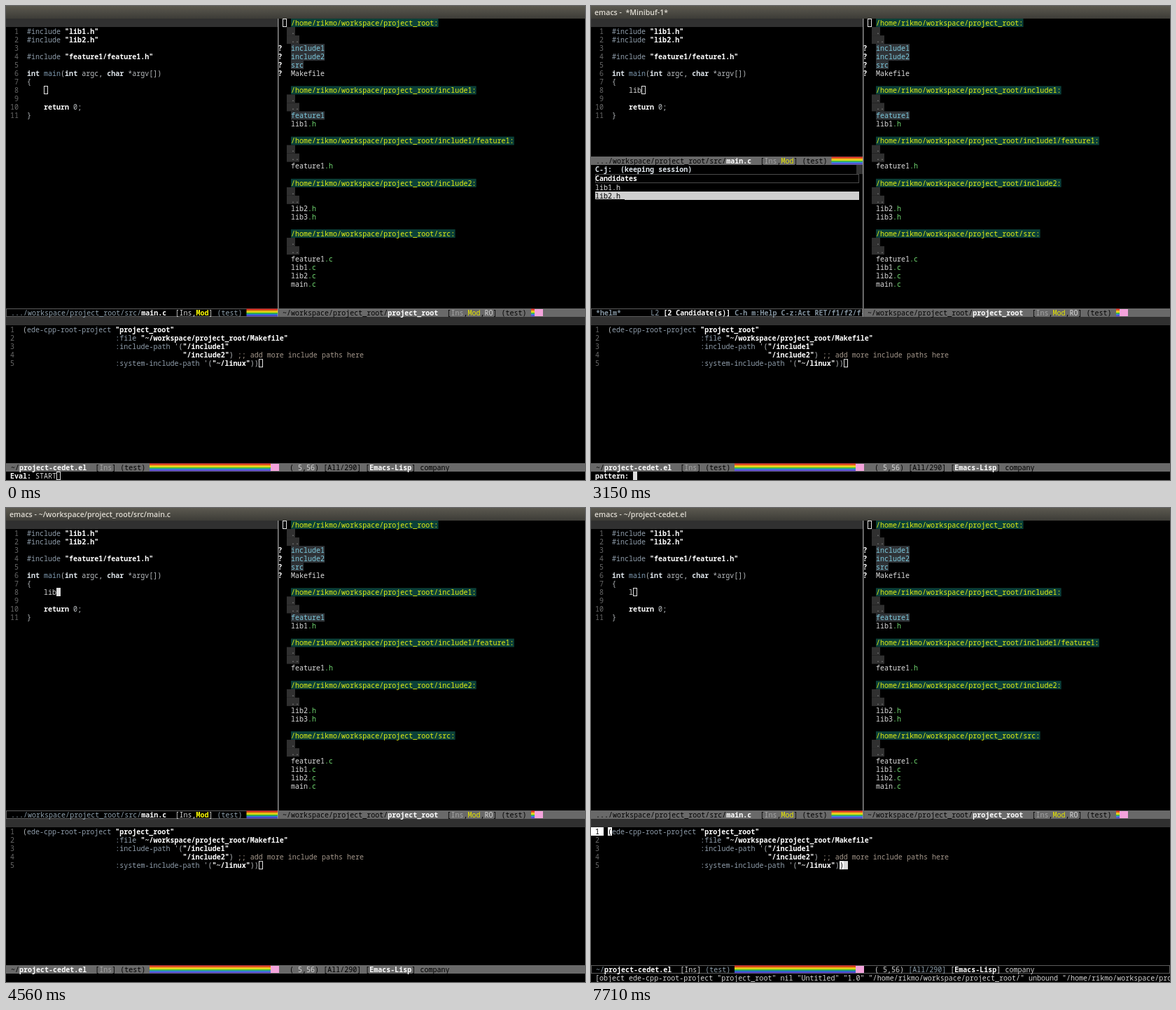
Write an HTML page that moves like this. It is 827 px wide and 677 px high and loops after 8 s.

```html
<!DOCTYPE html>
<html lang="en">
<head>
<meta charset="utf-8">
<title>emacs</title>
<style>
html, body { margin: 0; width: 100%; height: 100%; overflow: hidden; background: #000; }
svg { display: block; width: 827px; height: 677px; }
text { font: 10.025px "Noto Sans Mono", "DejaVu Sans Mono", monospace; white-space: pre; fill: #b9bdc0; }
.title { font: 600 10.6px "Open Sans", "Noto Sans", sans-serif; fill: #dfdbd2; }
.b, .str, .kw, .mod, .cmd { font-weight: 700; }
.b, .str { fill: #fff; }
.kw { fill: #dde4ea; }
.pre { fill: #8f9dab; }
.fn { fill: #7f9ab0; }
.cm { fill: #a3968a; }
.num { fill: #686868; }
.steel { fill: #8fa1ae; }
.cmd { fill: #8494a0; }
.lit { fill: #d6d6d6; }
.dark { fill: #000; }
.dim { fill: #a5a5a5; }
.yel { fill: #e6e600; }
.mod { fill: #ffff00; }
.path { fill: #e2ee12; }
.dir { fill: #7cc8dc; }
.dot { fill: #9a9a9a; }
.file { fill: #dcdcdc; }
.ext { fill: #6fd66f; }
</style>
</head>
<body>
<svg viewBox="0 0 827 677">
  <defs>
    <linearGradient id="bar" x2="0" y2="1">
      <stop offset="0" stop-color="#5b5950"/><stop offset="1" stop-color="#3d3c37"/>
    </linearGradient>
    <clipPath id="left"><rect width="388" height="677"/></clipPath>
  </defs>
  <g id="base"></g>
  <g id="live"></g>
</svg>
<script>
const LOOP = 8000, COL = 6.015, ROW = 12.04;
const USER = 'rikmo';
const HOME = `/home/${USER}/workspace/project_root`;
const RAINBOW = ['#e8231b', '#f59a16', '#f4ea1c', '#3fc62f', '#2b8df0', '#5b45d8'];

const rect = (x, y, w, h, fill) =>
  `<rect x="${x}" y="${y}" width="${w}" height="${h}" fill="${fill}"/>`;
const frame = (x, y, w, h, color) =>
  `<rect x="${x + .5}" y="${y + .5}" width="${w - 1}" height="${h - 1}" fill="none" stroke="${color}"/>`;

// Each run is "class|text"; top is the top edge of the text row.
const line = (x, top, ...runs) => `<text x="${x}" y="${top + 9.8}">` + runs.map(run => {
  const cut = run.indexOf('|');
  return `<tspan class="${run.slice(0, cut)}">${run.slice(cut + 1)}</tspan>`;
}).join('') + '</text>';

const cursor = (x, top, solid) => solid
  ? rect(x, top, 6, 12, '#dcdcdc')
  : frame(x, top, 6, 12, '#e6e6e6');

const rainbow = (x, top, w) =>
  RAINBOW.map((c, i) => rect(x, top + .5 + i * 1.8, w, 1.8, c)).join('');

const modeBar = (x, top, w, active) => active
  ? rect(x, top, w, 12, '#000') + frame(x, top, w, 12, '#5c5c5c')
  : rect(x, top, w, 12, '#696969');

const status = (active, ...more) => {
  const p = active ? 'lit' : 'dark';
  return [`${p}|  [`, active ? 'lit|Ins' : 'dim|Ins', ...more, `${p}|] `, `${active ? 'steel' : 'dark'}|(test)`];
};

function listing() {
  const X = 407, y = n => 18 + n * ROW;
  const out = [cursor(395, 18, false)];
  const head = (n, sub) => {
    const path = HOME + sub + ':';
    out.push(rect(X, y(n), path.length * COL, 12, '#0b4038'), line(X, y(n), 'path|' + path),
      rect(401, y(n + 1), 12, 12, '#303030'), line(X, y(n + 1), 'dot|.'),
      rect(401, y(n + 2), 18, 12, '#303030'), line(X, y(n + 2), 'dot|..'));
  };
  const dir = (n, name) => out.push(
    rect(X, y(n), name.length * COL, 12, '#303438'), line(X, y(n), 'dir|' + name));
  const files = (n, ...names) => names.forEach((name, i) => {
    const [stem, ext] = name.split('.');
    out.push(line(X, y(n + i), 'file|' + stem, 'ext|' + (ext ? '.' + ext : '')));
  });
  head(0, '');
  ['include1', 'include2', 'src'].forEach((d, i) => dir(3 + i, d));
  files(6, 'Makefile');
  for (let n = 3; n < 7; n++) out.push(line(388.5, y(n), 'b|?'));
  head(8, '/include1');
  dir(11, 'feature1');
  files(12, 'lib1.h');
  head(14, '/include1/feature1');
  files(17, 'feature1.h');
  head(19, '/include2');
  files(22, 'lib2.h', 'lib3.h');
  head(25, '/src');
  files(28, 'feature1.c', 'lib1.c', 'lib2.c', 'main.c');
  return out.join('');
}

function code() {
  const rows = [
    ['pre|#include ', 'str|"lib1.h"'],
    ['pre|#include ', 'str|"lib2.h"'],
    [],
    ['pre|#include ', 'str|"feature1/feature1.h"'],
    [],
    ['kw|int ', 'fn|main', '|(', 'kw|int', '| argc, ', 'kw|char', '| *argv[])'],
    ['|{'], [], [],
    ['b|    return', '| 0;'],
    ['|}']
  ];
  return rows.map((runs, i) => {
    const y = 30 + i * ROW;
    return line(6, y, 'num|' + String(i + 1).padStart(2)) + line(30, y, ...runs);
  }).join('');
}

const LISP = [
  [0, '|(', 'pre|ede-cpp-root-project ', 'str|"project_root"'],
  [22, 'pre|:file ', 'str|"~/workspace/project_root/Makefile"'],
  [22, 'pre|:include-path ', "|'(", 'str|"/include1"'],
  [38, 'str|"/include2"', '|) ', 'cm|;; add more include paths here'],
  [22, 'pre|:system-include-path ', "|'(", 'str|"~/linux"', '|))']
];

function lisp(s) {
  const active = s.focus === 'lisp';
  let out = '';
  LISP.forEach(([col, ...runs], i) => {
    const y = 456 + i * ROW;
    if (s.region) {
      out += rect(24, y, i < 4 ? 803 : 331, 12.1, '#0000ff');
      if (i) out += rect(0, y, 18, 12.1, '#0000ff');
      runs = runs.map(run => run.replace(/^\w*/, 'b'));
    }
    out += line(6, y, 'num|' + (i + 1)) + line(24 + col * COL, y, ...runs);
  });
  const end = 456 + 4 * ROW;
  if (s.paren) {
    out += rect(0, 456, 18, 12, '#fff') + line(6, 456, 'dark|1') +
      rect(24, 456, 6, 12, '#fff') + line(24, 456, 'dark|(') +
      rect(355, end, 6, 12, '#fff') + line(355, end, 'dark|)');
  }
  out += cursor(361, end, active);

  const p = active ? 'lit' : 'dark', q = active ? 'steel' : 'dark';
  return out + modeBar(0, 653, 827, active) +
    line(7, 653, `${q}|~/`, 'b|project-cedet.el', ...status(active)) +
    rainbow(205, 653, 173) + rect(378, 654, 12, 10, '#f4a3dc') +
    line(405, 653, `${p}|( `, 'lit|5', `${p}|,`, 'lit|56', `${p}|) `, `${q}|[All/290] `,
      `${p}|[`, 'b|Emacs-Lisp', `${p}|] `, `${p}|company`);
}

function mainBar(top, active) {
  const p = active ? 'lit' : 'dark';
  return modeBar(0, top, 388, active) +
    line(7, top, `${active ? 'steel' : 'dark'}|.../workspace/project_root/src/`, 'b|main.c',
      ...status(active, `${p}|,`, active ? 'mod|Mod' : 'yel|Mod')) +
    rainbow(343.5, top, 44.5);
}

function helm(pick) {
  const rowY = [253, 265];
  return mainBar(215, false) +
    rect(379, 227, 9, 13, '#333') +
    line(6, 227.5, 'kw|C-j:  (keeping session)') +
    frame(6, 240, 377, 13, '#4a4a4a') + line(6, 240, 'b|Candidates') +
    rect(6, rowY[pick - 1], 377, 12, '#d0d0d0') +
    rect(6, rowY[pick - 1] + 11, 42, 1, '#000') +
    rowY.map((y, i) => line(6, y, `${i + 1 === pick ? 'dark' : 'file'}|lib${i + 1}.h`)).join('') +
    modeBar(0, 432, 388, true) +
    '<g clip-path="url(#left)">' +
    line(7, 432, 'cmd|*helm*       ', `steel|L${pick} `, 'b|[2 Candidate(s)]', 'cmd| C-h m:Help C-z:Act RET/f1/f2/f-') +
    '</g>';
}

const ECHO = {
  none: '',
  evalIdle: line(6, 665, 'b|Eval:', 'lit| START') + cursor(72, 665, false),
  evalOn: line(6, 665, 'b|Eval:', 'lit| START') + cursor(72, 665, true),
  quit: line(6, 665, 'lit|Quit'),
  pattern: line(6, 665, 'b|pattern:') + cursor(60, 665, true),
  object: line(6, 665, `lit|[object ede-cpp-root-project "project_root" nil "Untitled" "1.0" "${HOME}/" unbound "${HOME}/Makefile"`)
};

const MINI = 'emacs -  *Minibuf-1*';
const MAIN = 'emacs - ~/workspace/project_root/src/main.c';
const CEDET = 'emacs - ~/project-cedet.el';

// Every step changes only the listed fields.
const STEPS = [
  [0, { title: '', typed: '', solid: false, focus: 'main', helm: 0, paren: false, region: false, echo: 'evalIdle' }],
  [510, { title: MINI }],
  [560, { echo: 'evalOn' }],
  [1620, { title: MAIN, solid: true, echo: 'quit' }],
  [2040, { typed: 'l' }],
  [2090, { echo: 'none' }],
  [2520, { title: MINI, typed: 'lib', solid: false, helm: 1, echo: 'pattern' }],
  [3150, { helm: 2 }],
  [3250, { helm: 1 }],
  [3410, { helm: 2 }],
  [3510, { helm: 1 }],
  [3560, { helm: 2 }],
  [4560, { title: MAIN, solid: true, helm: 0, echo: 'none' }],
  [4920, { typed: 'li' }],
  [5070, { typed: 'l' }],
  [5530, { title: CEDET, solid: false, focus: 'lisp' }],
  [5680, { paren: true }],
  [7290, { region: true, echo: 'object' }],
  [7710, { region: false }]
];
let state = {};
const STATES = STEPS.map(([at, change]) => ({ at, ...(state = { ...state, ...change }) }));

const base = document.getElementById('base');
const live = document.getElementById('live');

base.innerHTML = rect(0, 0, 827, 677, '#000') + rect(0, 0, 827, 18, 'url(#bar)') +
  rect(0, 18, 388, 12, '#303030') + rect(0, 444, 827, 12, '#303030') +
  rect(388, 18, 1.5, 426, '#8c8c8c') + code() + listing() +
  modeBar(389.5, 432, 437.5, false) +
  line(395, 432, 'dark|~/workspace/project_root/', 'b|project_root',
    ...status(false, 'dark|,', 'yel|Mod', 'dark|,', 'lit|RO')) +
  rainbow(750, 432, 5) + rect(755, 433, 12, 10, '#f4a3dc');

function draw(s) {
  const y = 30 + 7 * ROW;
  live.innerHTML = `<text class="title" x="5" y="12.8">${s.title}</text>` +
    line(54, y, 'lit|' + s.typed) +
    cursor(54 + s.typed.length * 6, 114, s.solid) +
    (s.helm ? helm(s.helm) : mainBar(432, s.focus === 'main')) +
    lisp(s) + ECHO[s.echo];
}

let shown;
function tick() {
  const t = performance.now() % LOOP;
  const now = STATES.findLast(s => s.at <= t);
  if (now !== shown) draw(shown = now);
  requestAnimationFrame(tick);
}
tick();
</script>
</body>
</html>
```
